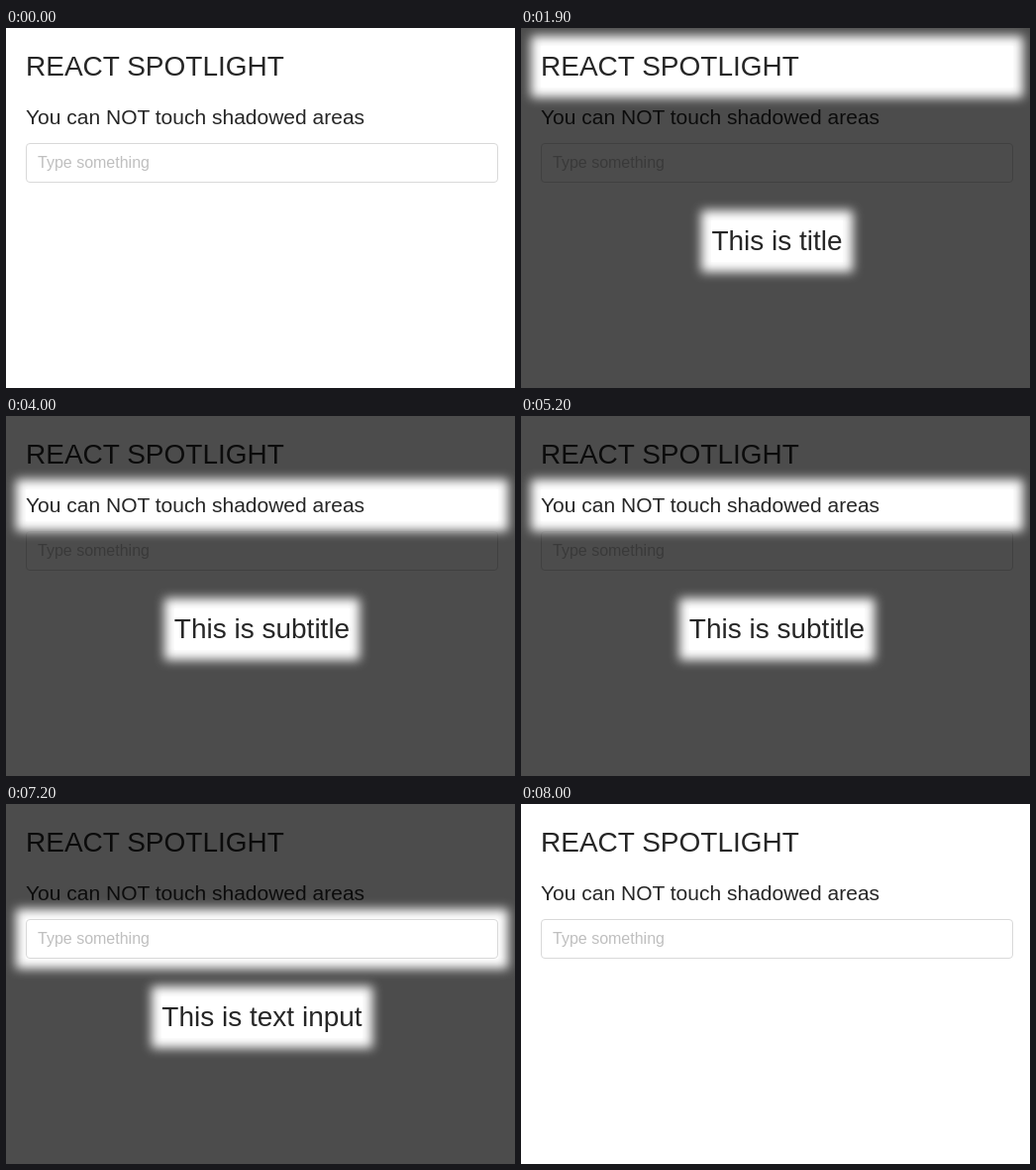
These frames come from a looping animation (514 by 363 pixels, 8.5 s). An HTML page:

```html
<!DOCTYPE html>
<html lang="en">
<head>
<meta charset="utf-8">
<title>React Spotlight</title>
<style>
  html, body { margin: 0; width: 100%; height: 100%; overflow: hidden; background: #fff; }
  body {
    position: relative;
    font: 14px/1.5 "Liberation Sans", Arial, sans-serif;
    color: rgba(0, 0, 0, .85);
  }
  h1, h2, .field { position: absolute; left: 20px; width: 477px; margin: 0; background: #fff; font-weight: 400; white-space: nowrap; }
  h1 { top: 18px; font-size: 28px; }
  h2 { top: 74px; font-size: 21px; }
  .field { top: 116px; height: 40px; }
  .input {
    box-sizing: border-box;
    height: 40px;
    padding: 7px 11px;
    border: 1px solid #d9d9d9;
    border-radius: 4px;
    font-size: 16px;
    line-height: 24px;
    color: #bfbfbf;
  }
  .shade { position: absolute; inset: 0; z-index: 1; background: rgba(0, 0, 0, .7); opacity: 0; }
  .note { position: absolute; left: 20px; top: 194px; width: 477px; z-index: 3; text-align: center; font-size: 28px; opacity: 0; }
  .note span { display: inline-block; background: #fff; box-shadow: 0 0 10px 10px #fff; }
</style>
</head>
<body>
  <h1 id="title">REACT SPOTLIGHT</h1>
  <h2 id="subtitle">You can NOT touch shadowed areas</h2>
  <div class="field" id="field"><div class="input">Type something</div></div>
  <div class="shade" id="shade"></div>
<script>
  const LOOP = 8500;
  const steps = [
    { id: 'title', text: 'This is title', from: 1900, to: 4000 },
    { id: 'subtitle', text: 'This is subtitle', from: 4000, to: 6000 },
    { id: 'field', text: 'This is text input', from: 6000, to: 8000 }
  ];
  const OFF = { opacity: 0 }, ON = { opacity: 1 };
  const DIM = { zIndex: 0, boxShadow: '0 0 10px 10px transparent' };
  const LIT = { zIndex: 2, boxShadow: '0 0 10px 10px #fff' };
  const byId = id => document.getElementById(id);

  // Hold "off" outside from..to and "on" within, with hard changes.
  function toggle(el, off, on, from, to) {
    const key = (state, time) => ({ ...state, offset: time / LOOP, easing: 'steps(1, end)' });
    const anim = el.animate(
      [key(off, 0), key(on, from), key(off, to), key(off, LOOP)],
      { duration: LOOP, iterations: Infinity }
    );
    anim.startTime = 0;
    return anim;
  }

  function addNote(text) {
    const note = document.createElement('div');
    const label = document.createElement('span');
    note.className = 'note';
    label.textContent = text;
    note.append(label);
    document.body.append(note);
    return note;
  }

  const anims = [toggle(byId('shade'), OFF, ON, steps[0].from, steps[2].to)];
  for (const { id, text, from, to } of steps) {
    anims.push(
      toggle(byId(id), DIM, LIT, from, to),
      toggle(addNote(text), OFF, ON, from, to)
    );
  }
  const start = document.timeline.currentTime || 0;
  anims.forEach(a => { a.startTime = start; });
</script>
</body>
</html>
```
